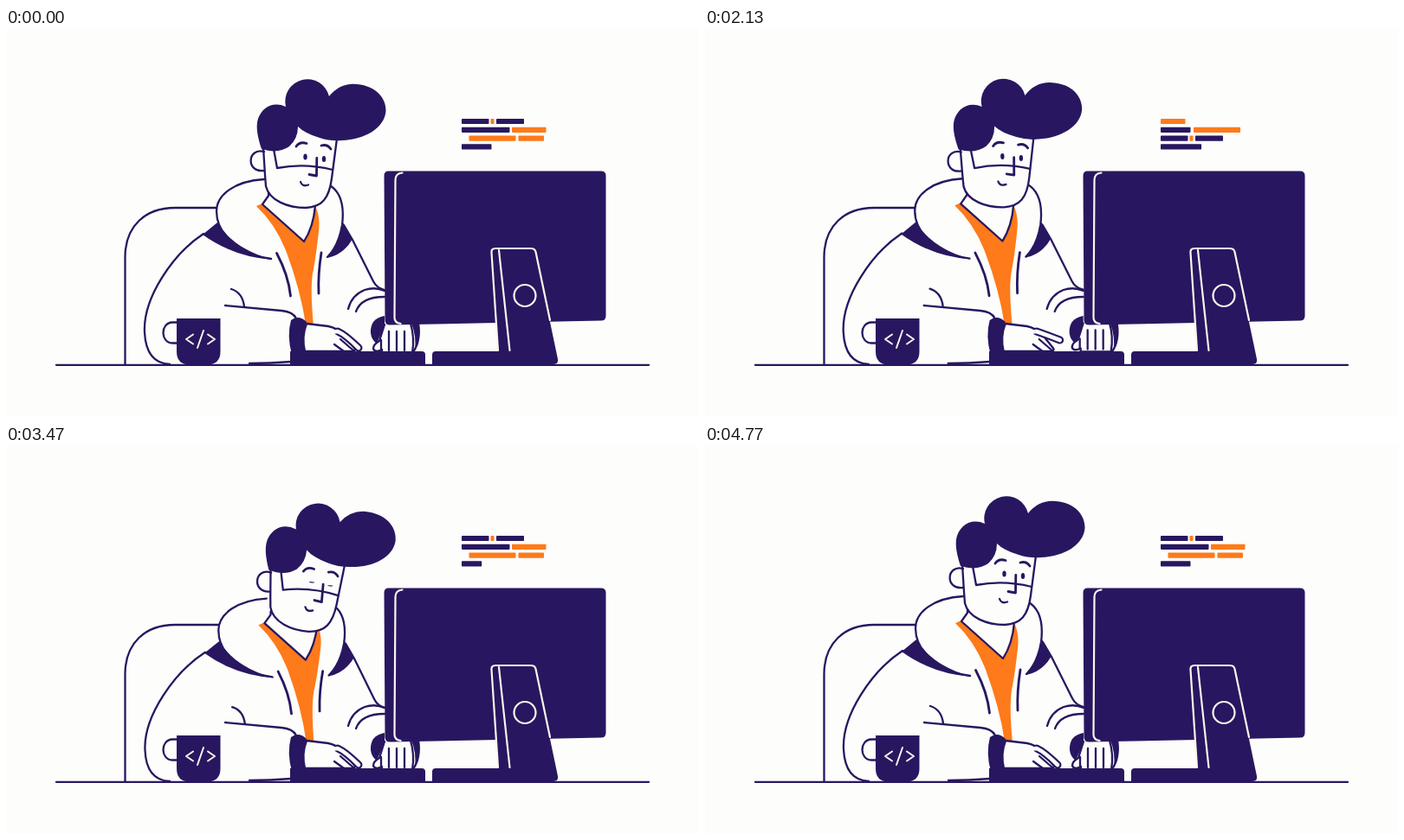
An HTML page for the animation above (4.81 s loop, 800 by 450 pixels).

```html
<!DOCTYPE html>
<html lang="en">
<head>
<meta charset="utf-8">
<title>Developer at work</title>
<style>
html, body { margin: 0; width: 100%; height: 100%; overflow: hidden; background: #fdfdfb; }
svg { display: block; width: 100vw; height: 100vh; }
.l { fill: none; stroke: #281760; stroke-width: 2.3; stroke-linecap: round; stroke-linejoin: round; }
.l.s, .s { fill: #fdfdfb; }
.b { stroke-width: 2.8; }
.n { fill: #281760; }
.o { fill: #fe7a1a; }
.c { fill: none; stroke: #fff4ec; stroke-width: 2.2; stroke-linecap: round; stroke-linejoin: round; }
</style>
</head>
<body>
<svg viewBox="0 0 800 450">
  <rect class="s" width="800" height="450"/>
  <path class="l" d="M137.500 389V265C137.500 229 161 208 195 208H246"/>

  <g id="torso">
    <path class="s" d="M243 226L228 238C193 261 158 312 160 352C161 375 168 389 188 389H420L437 340V303Q429 302 424 293L390 228L372 182L297 175C262 177 243 194 243 212Z"/>
    <path class="l" d="M228 238C193 261 158 312 160 352C161 373 169 388 189 389"/>
    <path class="l" d="M390 228L400 245L424 293Q428 301 437 303"/>
    <path class="n" d="M244 225L227 239Q263 265 308 268Q263 256 244 225Z"/>
    <path class="n" d="M389 225L400 244Q390 262 371 266Q386 248 389 225Z"/>
    <path class="l" d="M298 175C264 177 243 193 243 212C243 236 266 262 306 267M372 181C389 190 390 212 388 228Q384 252 371 265"/>
    <path class="o" d="M289 206L296 203L344 247L357 206Q363 218 361 235Q358 264 354 284Q351 302 355 345L346 343Q340 303 324 260Q312 228 289 206Z"/>
    <path class="s" d="M303 188L296 204L344 247Q355 230 357 205Z"/>
    <path class="l" d="M303 190L303 194L296 204L344 247Q355 230 357 205"/>
    <path class="l b" d="M312.500 260.500Q326 286 328.500 310M364 260Q360 285 361 307"/>
    <path class="l" d="M260 302Q273 306 275 322"/>
  </g>

  <g id="head">
    <path class="s" d="M297 130L300 183C303 200 326 208 346 208C365 207 373 197 376 174L382 128L340 100Z"/>
    <path class="l s" d="M298 143C278 138 277 168 298 165"/>
    <path class="l" d="M297 138L299 170L300 183C304 200 326 208 346 208C365 207 373 197 376 174L382 128"/>
    <path class="l" d="M309 140L313 162Q345 156 377 164"/>
    <g id="face">
      <path class="l b" d="M358.800 150.500L358.500 171L350 169.500M335 137Q339 131 347 133.500M364 136Q371 134 375 140"/>
      <path class="l" d="M340 178Q342 184 349 181.500"/>
      <ellipse class="n eye" cx="345.500" cy="149" rx="2.200" ry="3.500"/>
      <ellipse class="n eye" cx="367" cy="151.500" rx="2.200" ry="3.500"/>
    </g>
    <path class="n" d="M295 140C288 118 287 105 298 94Q309 85 323 91A25.500 25.500 0 1 1 373 79Q386 63 405 65C428 67 439 82 438.500 96C437 116 414 129 388 130Q374 131 362 127Q345 122 337 114Q337 128 327 137Q314 146 295 140Z"/>
  </g>

  <g id="arms">
    <path class="s" d="M253 321L318 327Q331 328 336 336L329 386L280 388Z"/>
    <path class="l" d="M253 321L318 327Q331 328 335 336M281 388Q305 388 329 386"/>
    <path class="l" d="M395 325Q399 309 414 303Q426 299 437 304M404 328Q410 311 437 311"/>
    <path class="n" d="M437 333Q420 336 421 353Q422 361 428 365L437 344Z"/>
    <path class="l s" d="M462 342H476Q479 362 470 375"/>
    <path class="n" d="M468 342H477Q479 362 472 373Q474 356 468 342Z"/>
    <g id="right">
      <path class="l s" d="M437 343L431 362Q424 366 424 371Q426 376 434 372V376H469Q472 358 467 342"/>
      <path class="l" d="M433 361V372M442 351V373M451 351V373M460 351V373"/>
    </g>
    <path class="n" d="M329 338Q338 331 347 340Q341 355 345 374L330 378Q324 356 329 338Z"/>
    <path class="l s" d="M347 342L372 345Q382 347 390 355L402 370Q405 374 398 374H345Q341 357 347 342Z"/>
    <path class="l" d="M379 366L390 374M386 360L401 373"/>
    <path id="rim" class="l" style="stroke-width:9"/>
    <path id="skin" class="l" style="stroke:#fdfdfb;stroke-width:4.600"/>
  </g>

  <path class="n" d="M328 374H480Q484 374 484 378V389H328Z"/>
  <path class="l" d="M58 389.800H742"/>
  <path class="n" d="M441.500 165.500H687Q692.500 165.500 692.500 171V333Q692.500 338.500 687 338.500L443.500 343.500Q437.500 343.500 437.500 338L436.500 171Q436.500 165.500 441.500 165.500Z"/>
  <path class="c" d="M457.500 167.500Q449.500 168 449.500 176L448.500 335Q448.500 341 455.500 342"/>
  <path class="n" d="M492 389V378Q492 374 496 374H568L561 260Q560 255 565 255H605Q610 255 611 259L637 383Q638 389 631 389Z"/>
  <path class="c" d="M568 373L560.500 260Q560 255 565 255H606Q610.500 255 611.500 259L628 338M569 257L581.500 373"/>
  <circle class="c" cx="599" cy="309.500" r="12.500"/>

  <path class="l s" d="M198 340.500H192C178 341 178 364 192 364.500H198"/>
  <path class="n" d="M197 336H247.500V374Q247.500 389.500 232 389.500H212Q197 389.500 197 374Z"/>
  <path class="c" style="stroke-width:2" d="M216 354.500L208 360L216 365.500M228 350L221 370M233 354.500L241 360L233 365.500"/>
  <g id="code"></g>
</svg>
<script>
const LOOP = 4810;
const $ = id => document.getElementById(id);
const clamp = v => Math.max(0, Math.min(1, v));
const smooth = v => (v = clamp(v), v * v * (3 - 2 * v));
const bump = (t, a, b, c) => smooth((t - a) / (b - a)) * smooth((c - t) / (c - b));

// Each bar: left, right, colour class.
const A = [[526, 557.5, 'n'], [559.5, 563.5, 'o'], [566, 598, 'n']];
const B = [[526, 581.5, 'n'], [584, 623.5, 'o']];
const C = [[534.5, 588.5, 'o'], [591.5, 621, 'o']];
const D = [[526, 560.5, 'n']];
const E = [[526, 554.5, 'o']];
const F = [[526, 560.5, 'n'], [564, 618, 'o']];

// Typed lines begin and end at these times.
const spans = [[150, 270], [430, 910], [1300, 1690], [1880, 2400], [2600, 3060], [3350, 3530]];
const lines = [A, B, C, D, E, F, A, B, C, D].map((bars, i) => ({
  span: spans[i - 4],
  bars: bars.map(([a, b, cls]) => {
    const el = document.createElementNS('http://www.w3.org/2000/svg', 'rect');
    el.setAttribute('class', cls);
    el.setAttribute('height', 6.2);
    el.setAttribute('rx', 0.8);
    el.setAttribute('x', a);
    $('code').append(el);
    return { el, a, b };
  })
}));

function drawCode(t) {
  const scroll = spans.reduce((s, [a]) => s + smooth((t - a + 120) / 120), 0);
  lines.forEach(({ span, bars }, i) => {
    const row = i - scroll;
    let y = 137.4 + (row - 3) * 9.8;
    if (row < 2.9) y -= 2 * bump(t, 1380, 1540, 1760);
    if (row < 0.5) y -= 1.7 * bump(t, 2560, 2670, 2800);
    const first = bars[0].a, last = bars[bars.length - 1].b;
    const p = span ? clamp((t - span[0]) / (span[1] - span[0])) : 1;
    const edge = first + (last - first) * p;
    for (const { el, a, b } of bars) {
      el.setAttribute('y', y - 3.1);
      el.setAttribute('width', Math.max(0, Math.min(b, edge) - a));
      el.setAttribute('opacity', clamp(1 + row * 2));
    }
  });
}

const leanKeys = [[0, 0], [1100, 0], [1530, -0.2], [1870, -0.5], [2350, -0.12], [2670, 0],
  [3000, 0], [3260, -0.3], [3470, 1], [3620, 0.7], [3970, -0.35], [4400, -0.1], [4770, 0], [LOOP, 0]];

function lean(t) {
  const i = leanKeys.findIndex(k => k[0] > t);
  const [a, v] = leanKeys[i - 1], [b, w] = leanKeys[i];
  return v + (w - v) * smooth((t - a) / (b - a));
}

function drawMan(t) {
  const l = lean(t), shift = -2.4 * bump(t, 1150, 1560, 2300);
  const nod = Math.max(0, l);
  const k = l * 0.013, d = 1 - l * 0.012;
  $('torso').setAttribute('transform',
    `matrix(1 0 ${-k} ${d} ${k * 389 + shift * 0.35} ${389 * (1 - d)})`);
  $('head').setAttribute('transform',
    `translate(${3.4 * l} ${l * 2 + nod * 5.8}) rotate(${4.1 * l} 345 208)`);
  $('face').setAttribute('transform', `translate(0 ${nod * 1.8})`);
  $('arms').setAttribute('transform', `translate(${shift} 0)`);

  const shut = bump(t, 3350, 3470, 3590);
  document.querySelectorAll('.eye').forEach(e => {
    e.setAttribute('ry', 3.5 - 2.9 * shut);
    e.setAttribute('rx', 2.2 + 1.2 * shut);
  });

  // Finger taps while the lines are being typed.
  const tap = t < 3480 ? clamp(2 * Math.sin(2 * Math.PI * (t / 290 - 0.1))) : 0;
  const curve = `383 351Q392 ${355 - tap} ${407 + 3 * tap} ${370 - 9 * tap}`;
  $('rim').setAttribute('d', 'M' + curve);
  $('skin').setAttribute('d', 'M374 352L' + curve);
  $('right').setAttribute('transform', `translate(0 ${-1.5 * tap})`);
}

function draw(now) {
  const t = now % LOOP;
  drawMan(t);
  drawCode(t);
}

const start = performance.now();
function tick() {
  draw(performance.now() - start);
  requestAnimationFrame(tick);
}
tick();
</script>
</body>
</html>
```
